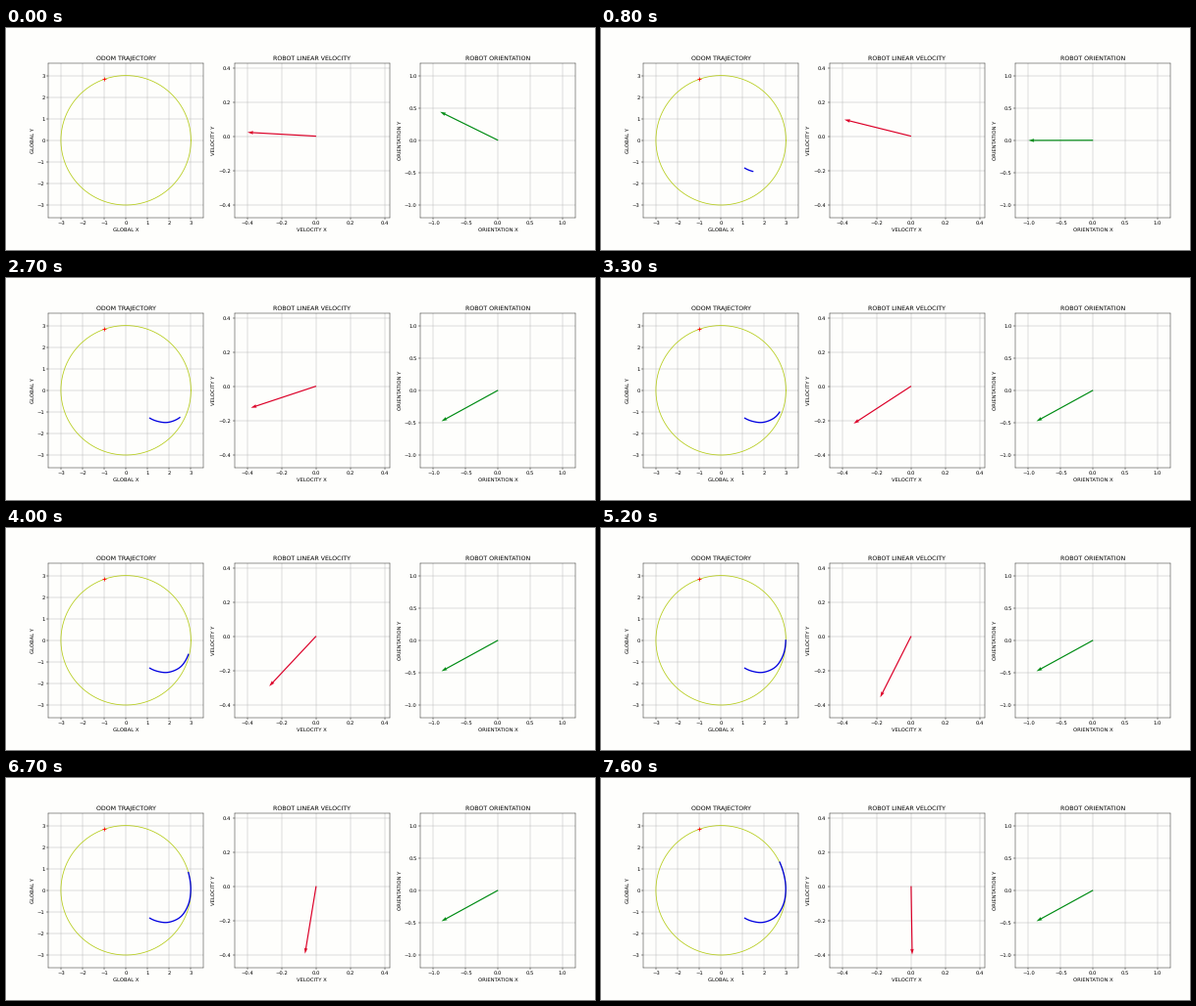
Write a matplotlib script that moves like this. It is 600 px wide and 227 px high and loops after 7700 ms.

```python
import numpy as np
import matplotlib.pyplot as plt
from matplotlib.animation import FuncAnimation
from matplotlib.ticker import MultipleLocator

FRAMES, STEP = 77, 100
DPI = 37.5
PAPER = "#fefefc"

plt.rcParams.update({
    "font.family": "DejaVu Sans",
    "text.hinting": "none",
    "figure.facecolor": PAPER,
    "axes.facecolor": PAPER,
})


def smooth(keys, values, t):
    """Cubic Hermite curve through the key values."""
    keys, values = np.asarray(keys, float), np.asarray(values, float)
    slope = np.gradient(values, keys, edge_order=2)
    i = np.clip(np.searchsorted(keys, t, side="right") - 1, 0, len(keys) - 2)
    h = keys[i + 1] - keys[i]
    u = (t - keys[i]) / h
    return ((1 + 2 * u) * (1 - u) ** 2 * values[i]
            + u * (1 - u) ** 2 * h * slope[i]
            + u ** 2 * (3 - 2 * u) * values[i + 1]
            + u ** 2 * (u - 1) * h * slope[i + 1])


t = np.arange(FRAMES)

# Robot path: cuts across the disc, then follows the circle.
path_keys = [0, 8, 16, 27, 40, 52, 67, 76]
path_x = smooth(path_keys, [1.11, 1.48, 1.91, 2.5, 2.9, 3.01, 2.9, 2.73], t)
path_y = smooth(path_keys, [-1.3, -1.45, -1.5, -1.27, -0.66, 0.0, 0.83, 1.31], t)

# Body velocity direction and heading, in degrees.
vel_angle = smooth(path_keys,
                   [176.8, 166, 163.4, 198.4, 227, 243.3, 260.7, 270.9], t)
yaw = 208.8 - 55.1 * (np.clip(24 - t, 0, None) / 24) ** 1.61


def panel(ax, title, name, low, high, tick):
    ax.set_title(title)
    ax.set_xlabel(name + " X")
    ax.set_ylabel(name + " Y")
    ax.set(xlim=(low, high), ylim=(low, high))
    for axis in (ax.xaxis, ax.yaxis):
        axis.set_major_locator(MultipleLocator(tick))
    ax.grid(True)


def arrow(ax, color):
    return ax.quiver([0], [0], [1], [0], color=color, angles="xy",
                     scale_units="xy", scale=1, zorder=3)


def point(q, angle, length):
    a = np.radians(angle)
    q.set_UVC([length * np.cos(a)], [length * np.sin(a)])


fig, (odom, vel, ori) = plt.subplots(1, 3, figsize=(600 / DPI, 227 / DPI), dpi=DPI)
fig.subplots_adjust(left=0.072, right=0.967, bottom=0.1465, top=0.842, wspace=0.2)
panel(odom, "ODOM TRAJECTORY", "GLOBAL", -3.6, 3.6, 1)
panel(vel, "ROBOT LINEAR VELOCITY", "VELOCITY", -0.475, 0.427, 0.2)
panel(ori, "ROBOT ORIENTATION", "ORIENTATION", -1.2, 1.2, 0.5)

ring = np.linspace(0, 2 * np.pi, 200)
odom.plot(3.02 * np.cos(ring), 3.02 * np.sin(ring), color="#b5cc18", lw=1.5)
odom.plot([-1], [2.85], "r+", ms=9, mew=1.5, zorder=4)
trail, = odom.plot([], [], color="#0000e0", lw=2.5, zorder=3)
vel_arrow = arrow(vel, "#dc0028")
ori_arrow = arrow(ori, "#008c14")


def draw(i):
    trail.set_data(path_x[:i + 1], path_y[:i + 1])
    point(vel_arrow, vel_angle[i], 0.4)
    point(ori_arrow, yaw[i], 1)
    return trail, vel_arrow, ori_arrow


anim = FuncAnimation(fig, draw, frames=FRAMES, interval=STEP, repeat=True,
                     repeat_delay=0, init_func=lambda: draw(0))
plt.show()
```
